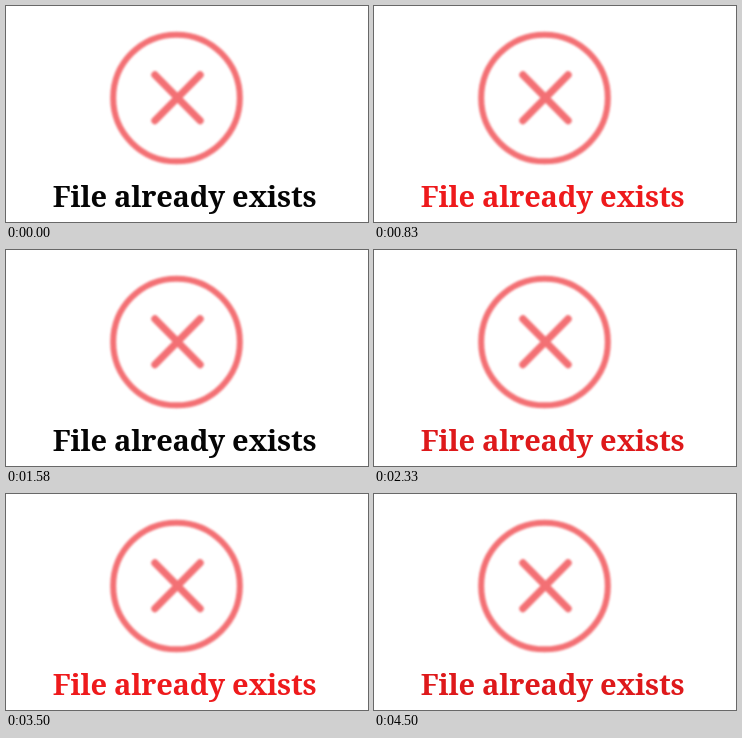
These frames come from a looping animation (362x216 px, 5.01 s). An HTML page:

```html
<!DOCTYPE html>
<html lang="en">
<head>
<meta charset="utf-8">
<title>File already exists</title>
<style>
  html, body { margin: 0; width: 100%; height: 100%; overflow: hidden; background: #fff; }
  svg { display: block; width: 362px; height: 216px; }
  .icon { fill: none; stroke: #f37074; stroke-linecap: round; filter: blur(0.8px); }
  text { font: bold 29px "PT Serif", "Noto Serif", serif; letter-spacing: -0.22px; text-anchor: middle; }
</style>
</head>
<body>
<svg viewBox="0 0 362 216">
  <g class="icon">
    <circle cx="170.5" cy="92" r="63.3" stroke-width="6"/>
    <path d="M149 69 L194 114.5 M194 69 L149 114.5" stroke-width="7.4"/>
  </g>
  <text id="label" x="178.5" y="201">File already exists</text>
</svg>
<script>
  const LOOP = 5010;
  const BLACK = '#050505', MID = '#7d0f10', DEEP = '#de191b', RED = '#ee1a1c';

  // [start in ms, text colour], each held until the next step
  const steps = [
    [0, BLACK],
    [750, MID], [830, RED],
    [1500, MID], [1580, BLACK],
    [2330, DEEP], [2420, RED],
    [3000, BLACK],
    [3420, MID], [3500, RED],
    [3830, MID], [3920, BLACK],
    [4420, MID], [4500, DEEP],
    [LOOP, DEEP]
  ];

  document.getElementById('label').animate(
    steps.map(([time, fill]) => ({ offset: time / LOOP, fill, easing: 'step-end' })),
    { duration: LOOP, iterations: Infinity }
  );
</script>
</body>
</html>
```
